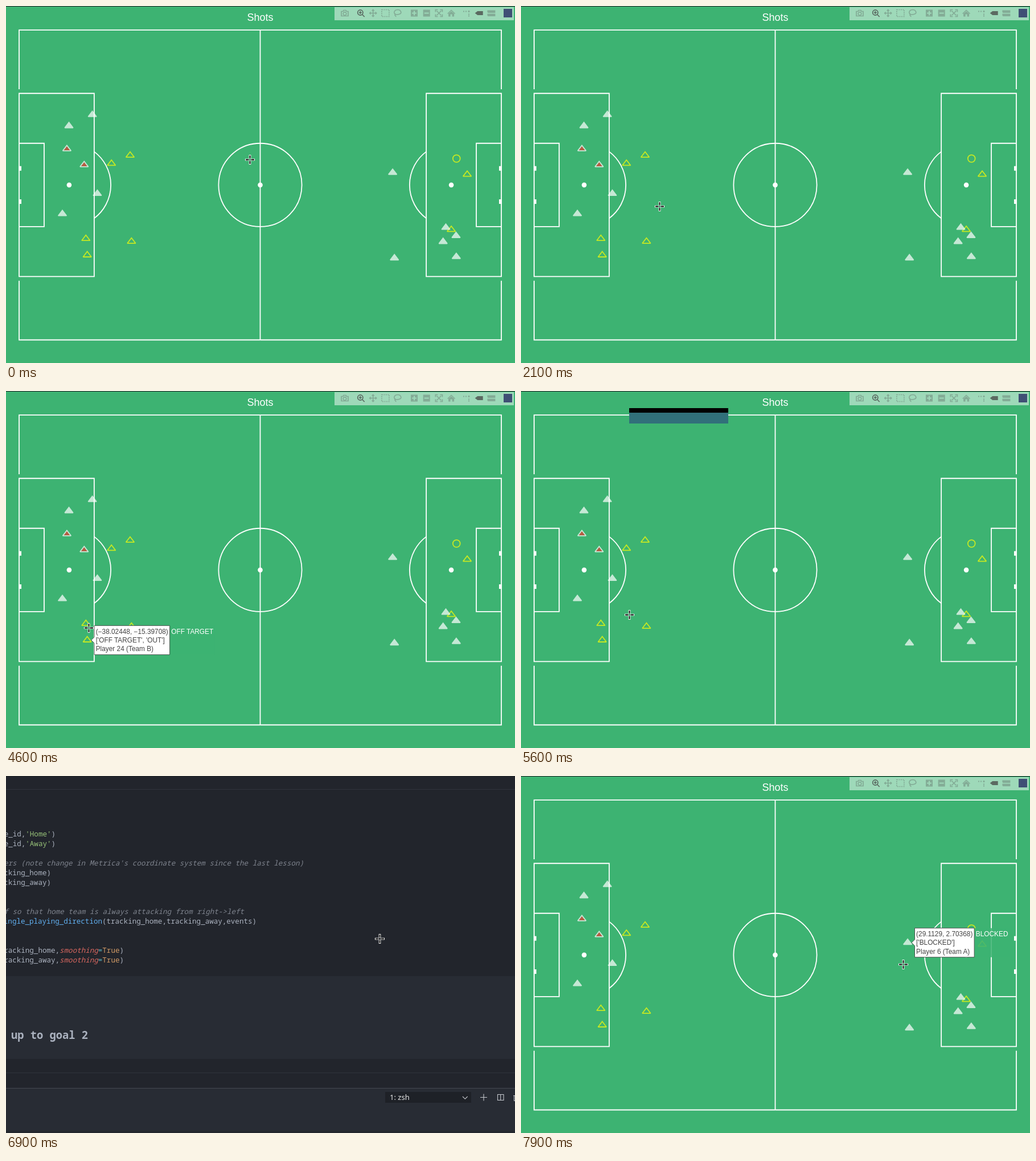
Recreate the animation shown at these times as an HTML page. Size 894x626 px, loop 8000 ms.

```html
<!DOCTYPE html>
<html lang="en">
<head>
<meta charset="utf-8">
<title>Shots</title>
<style>
  html, body { margin: 0; width: 100%; height: 100%; overflow: hidden; background: #3db372; }
  svg { display: block; }
  text { white-space: pre; }
  .sans { font-family: "Liberation Sans", Arial, sans-serif; }
  .pitch { fill: none; stroke: #fff; stroke-width: .225; }
  .pitch .solid { fill: #fff; stroke: none; }
  .marks { opacity: 1; stroke-width: 1.8; stroke-miterlimit: 2; }
  .marks * { opacity: .7; }
  .bar { fill: none; stroke: #444; stroke-width: 1.7; }
  .bar .solid { fill: #444; stroke: none; fill-rule: evenodd; }
  .tip { font-size: 11.85px; fill: #444; }
  .code { font: 12.55px "Noto Sans Mono", monospace; fill: #abb2bf; text-anchor: end; }
  .code .c { fill: #7f848e; font-style: italic; }
  .code .s { fill: #98c379; }
  .code .f { fill: #61afef; }
  .code .p { fill: #d8675f; font-style: italic; }
  .code .o { fill: #56b6c2; }
  .code .k { fill: #d19a66; }
</style>
</head>
<body>
<svg width="894" height="626" viewBox="0 0 894 626">
  <rect width="894" height="626" fill="#3db372"/>
  <text class="sans" x="446.5" y="26" font-size="18" fill="#fff" text-anchor="middle">Shots</text>
  <!-- Pitch in metres, the left half mirrors the right -->
  <g class="pitch" transform="translate(446.5 313.85) scale(7.99)">
    <g id="half">
      <path d="M0-34H53V-21M53 21V34H0M53-20.1H36.5V20.1H53ZM53-9.15H47.5V9.15H53"/>
      <path d="M36.5-7.32A9.15 9.15 0 0 0 36.5 7.32"/>
      <circle class="solid" cx="42" r=".54"/>
      <path class="solid" d="M52.5-4.15h.6v1h-.6zM52.5 3.15h.6v1h-.6z"/>
    </g>
    <use href="#half" transform="scale(-1 1)"/>
    <path d="M0-34V34"/>
    <circle r="9.15"/>
    <circle class="solid" r=".54"/>
  </g>
  <g class="marks" id="marks"></g>
  <rect x="577" y="2" width="315" height="23" fill="#fff" opacity=".5"/>
  <g class="bar" id="bar"></g>
  <rect x="874" y="5" width="15" height="15" fill="#3f4f75"/>
  <g id="tips"></g>
  <g id="flash">
    <rect x="190" y="30" width="174" height="27" fill="#31707a"/>
    <rect x="190" y="30" width="174" height="8"/>
  </g>
  <g id="editor">
    <rect width="894" height="626" fill="#22252c"/>
    <path fill="#282c34" d="M0 351H894V496H0ZM0 548H894V626H0Z"/>
    <path stroke="#30343c" d="M0 23.5H894M0 520.5H894"/>
    <path stroke="#444851" d="M0 547.5H894"/>
    <rect y="622" width="894" height="4" fill="#23272e"/>
    <g class="code" id="code"></g>
    <text x="9" y="460.5" font-family="Noto Sans Mono, monospace" font-size="18.75" font-weight="700" fill="#abb2bf">up to goal 2</text>
    <rect x="666" y="554" width="151" height="19" fill="#1e2127"/>
    <text x="674" y="568" font-family="Noto Sans, sans-serif" font-size="13" fill="#e8e8e8">1: zsh</text>
    <path fill="none" stroke="#c5c8cd" stroke-width="1.1" d="M802 562l4.300 4.300 4.300-4.300M833 563.500h12m-6-6v12M863.500 558.500h10.500v10h-10.500zm5.200 0v10M891 560.500h3m-1.500 0v9h1.500"/>
  </g>
  <rect width="894" height="1" fill="#1d2125"/>
  <g id="cursor">
    <path stroke="#fff" stroke-width="3.600" d="M0-8.500V-1.500M0 1.500V8.500M-8.500 0H-1.500M1.500 0H8.500"/>
    <path stroke="#000" stroke-width="1.800" d="M0-7.500V-2M0 2V7.500M-7.500 0H-2M2 0H7.500"/>
  </g>
</svg>
<script>
const $ = id => document.getElementById(id);
const show = (el, on) => el.setAttribute('display', on ? 'inline' : 'none');
const toStage = ([x, y]) => [446.5 + 7.99 * x, 313.85 - 7.99 * y];

// Shots in metres from the centre spot; those with details get a hover label
const hovered = [
  [-43.48862, -6.34848, 'SAVED', "['ON TARGET', 'SAVED']", 'Player 27 (Team B)'],
  [29.1129, 2.70368, 'BLOCKED', "['BLOCKED']", 'Player 6 (Team A)'],
  [-38.32386, -11.79284, 'OFF TARGET', "['OFF TARGET', 'OUT']", 'Player 20 (Team B)'],
  [-38.02448, -15.39708, 'OFF TARGET', "['OFF TARGET', 'OUT']", 'Player 24 (Team B)'],
];
const missed = [...hovered.slice(2), [-28.6, 6.5], [-32.7, 4.7], [-28.3, -12.4], [45.5, 2.3], [42, -9.8]];
const scored = [[-42.5, 7.9], [-38.7, 4.4]];
const stopped = [...hovered.slice(0, 2), [-36.9, 15.4], [-42.05, 12.95], [-35.8, -1.9],
  [40.8, -9.35], [43.05, -11.15], [40.2, -12.45], [43.1, -15.75], [29.5, -16.05]];

const triangles = (shots, fill, stroke) => shots.map(toStage).map(([x, y]) =>
  `<path fill="${fill}" stroke="${stroke}" d="M${x - 7.27} ${y + 3.15}h14.54L${x} ${y - 6.3}Z"/>`).join('');
const [headX, headY] = toStage([43.15, 5.8]);
$('marks').innerHTML =
  triangles(missed, 'none', '#ff0') +
  `<circle cx="${headX}" cy="${headY}" r="6.4" fill="none" stroke="#ff0"/>` +
  triangles(scored, '#e8382f', '#fff') +
  triangles(stopped, '#fff', '#fff');

// Toolbar icons, each drawn around its own centre
const solid = d => `<path class="solid" d="${d}"/>`;
const line = d => `<path d="${d}"/>`;
const ring = (r, x = 0, y = 0) => `<circle cx="${x}" cy="${y}" r="${r}"/>`;
const corners = [0, 90, 180, 270].map(a => `<path transform="rotate(${a})" d="M-6-2V-6H-2M0 0L-4-4"/>`).join('');
const arrows = [0, 90, 180, 270].map(a => `<path transform="rotate(${a})" d="M0 0V-6M-2-4L0-6L2-4"/>`).join('');
const toolbar = [
  [595, [ring(2.8, 0, 1) + line('M-6-3H-3L-2-5H2L3-3H6V5H-6Z')]],
  [623, [
    ring(4.6, -.7, -1) + line('M2.7 2.500l4 4M-3-1h5M-.7-3.500v5'),
    arrows,
    '<path stroke-dasharray="2 1.5" d="M-6.500-6h13v12h-13z"/>',
    line('M-4 2C-9-1-5-6 0-6S9 1 2 2Q-2 3-4 2q-2 1-.5 2.200t1 2.300'),
  ]],
  [717, [
    solid('M-6-6H6V6H-6ZM-1-4v3h-3v2h3v3h2v-3h3v-2h-3v-3z'),
    solid('M-6-6H6V6H-6ZM-4-1v2h8v-2z'),
    corners,
    solid('M0-6L7 .5 6 1.500 0-4-6 1.500-7 .5ZM-5 1L0-3 5 1V6H1.500V2h-3V6H-5Z'),
  ]],
  [809, [
    solid('M4-5l2 2-2 2-2-2zM-6-4h2v2h-2zM-2-4h2v2h-2zM3 1h2v2h-2zM3 4h2v2h-2z'),
    solid('M-7 0l4.500-3.500H7v7H-2.500z'),
    solid('M-7-5H7v4.500H-6L-7-2zM-7 1H7V5.500H-6L-7 4z'),
  ]],
];
const active = ['1,0', '3,1'];
$('bar').innerHTML = toolbar.map(([x, icons], group) => icons.map((icon, i) =>
  `<g transform="translate(${x + 21.7 * i} 12.5)" opacity="${active.includes(`${group},${i}`) ? .75 : .3}">${icon}</g>`
).join('')).join('');

// Hover labels
const tips = hovered.map(([mx, my, name, detail, player]) => {
  const [x, y] = toStage([mx, my]);
  const el = document.createElementNS('http://www.w3.org/2000/svg', 'g');
  el.setAttribute('class', 'sans tip');
  el.setAttribute('transform', `translate(${x + 7} ${y})`);
  $('tips').append(el);
  const label = (s, left, row, fill) => `<text x="${left}" y="${15.2 * row - 11}" fill="${fill}">${s}</text>`;
  const body = [`(${mx}, ${my})`.replaceAll('-', '−'), detail, player]
    .map((s, row) => label(s, 8, row, '#444')).join('');
  el.innerHTML = body + label(name, 0, 0, '#fff');
  const widths = [...el.children].map(t => t.getComputedTextLength() + 5.4);
  const nameWidth = widths.pop(), w = Math.max(...widths);
  el.innerHTML =
    `<rect x="${5.4 + w}" y="-25.5" width="${nameWidth}" height="51" fill="#3db372" opacity=".85"/>` +
    `<path fill="#fff" stroke="#444" stroke-width=".9" d="M0 0L5.4 5.4V25.5h${w}v-51H5.4V-5.4Z"/>` +
    body + label(name, 8.1 + w, 0, '#fff');
  return { el, x, y };
});

// Code lines: [right edge, row, markup]
const span = (cls, s) => `<tspan class="${cls}">${s}</tspan>`;
const load = team => `e_id,${span('s', `'${team}'`)})`;
const smooth = team => `tracking_${team},${span('p', 'smoothing')}${span('o', '=')}${span('k', 'True')})`;
$('code').innerHTML = [
  [87, 0, load('Home')],
  [87, 1, load('Away')],
  [523, 3, span('c', "ers (note change in Metrica's coordinate system since the last lesson)")],
  [79, 4, 'tracking_home)'],
  [79, 5, 'tracking_away)'],
  [418, 8, span('c', 'f so that home team is always attacking from right-&gt;left')],
  [440, 9, span('f', 'single_playing_direction') + '(tracking_home,tracking_away,events)'],
  [207, 12, smooth('home')],
  [207, 13, smooth('away')],
].map(([x, row, s]) => `<text x="${x}" y="${106.3 + 17 * row}">${s}</text>`).join('');

// Pointer moves: [start ms, end ms, x, y]
const moves = [
  [100, 1000, 457, 32], [1100, 1900, 243, 373], [1900, 2200, 243, 342], [2200, 2400, 217, 350],
  [2600, 2800, 93, 370], [4000, 4100, 115, 379], [4100, 4400, 146, 430], [4400, 4700, 145, 408],
  [5300, 5600, 190, 392], [5600, 6200, 586, 387], [6200, 6500, 644, 300], [6500, 6700, 625, 283],
  [6800, 6900, 656, 285], [6900, 7000, 672, 292], [7800, 7900, 671, 330],
];
const ease = k => (k + k * k * (3 - 2 * k)) / 2;
function pointerAt(t) {
  let x = 428, y = 269;
  for (const [from, to, toX, toY] of moves) {
    const k = ease(Math.min(1, Math.max(0, (t - from) / (to - from))));
    x += (toX - x) * k;
    y += (toY - y) * k;
  }
  return [x, y];
}

const TICK = 100, LOOP = 8000, HOVER_RADIUS = 25;
function draw() {
  const t = Math.floor(performance.now() % LOOP / TICK) * TICK;
  const [x, y] = pointerAt(t);
  $('cursor').setAttribute('transform', `translate(${Math.round(x) + .5} ${Math.round(y) + .5})`);

  // Labels follow the pointer one tick late
  const [px, py] = pointerAt(t - TICK);
  const distance = tip => Math.hypot(tip.x - px, tip.y - py);
  const nearest = tips.reduce((a, b) => distance(b) < distance(a) ? b : a);
  tips.forEach(tip => show(tip.el, tip === nearest && distance(tip) < HOVER_RADIUS));

  show($('flash'), t === 5600);
  show($('editor'), t === 6900);
  requestAnimationFrame(draw);
}
draw();
</script>
</body>
</html>
```
